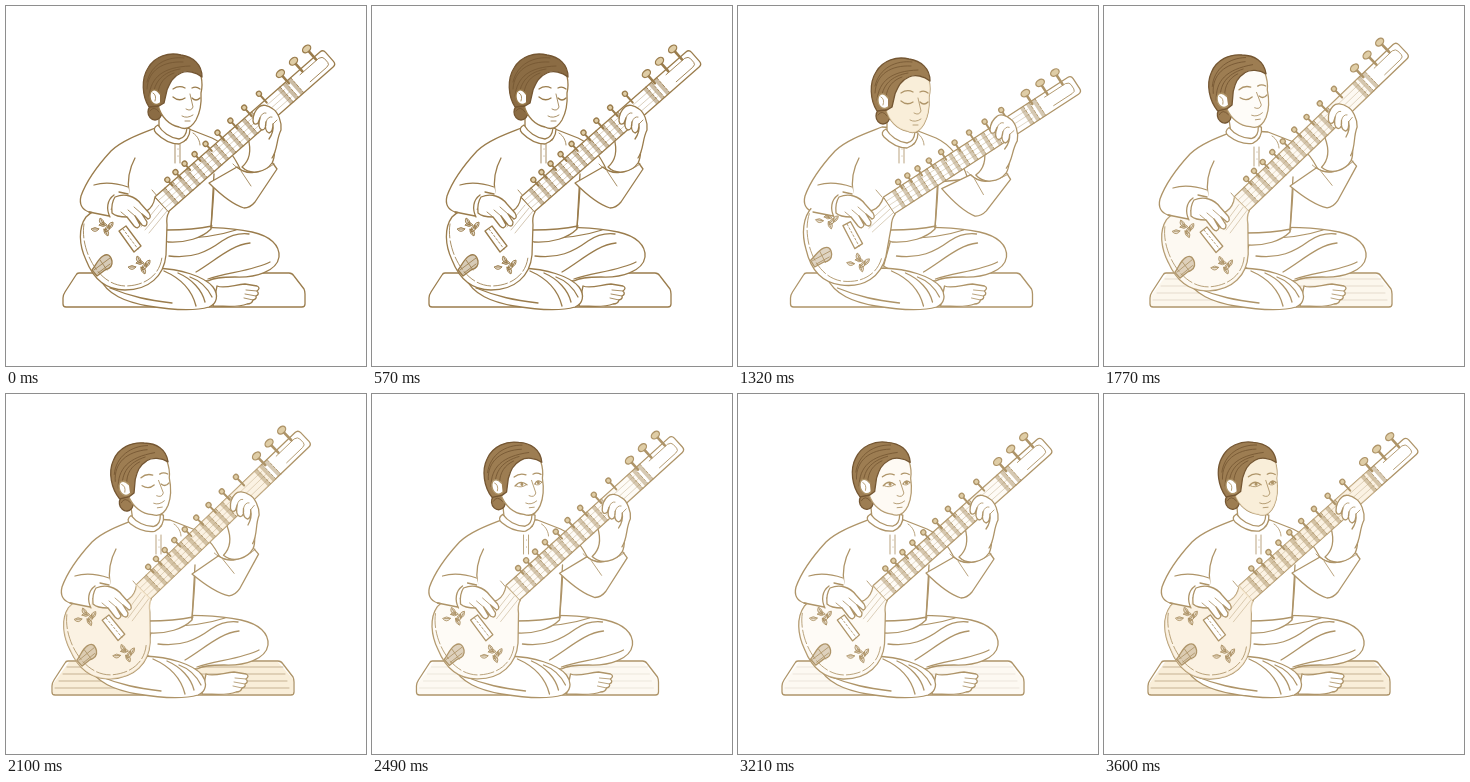
An HTML page that plays this animation: 360x360 px, repeating every 3.63 s.

```html
<!DOCTYPE html>
<html lang="en">
<head>
<meta charset="utf-8">
<title>Sitar player</title>
<style>
html, body { margin: 0; width: 100%; height: 100%; overflow: hidden; background: #fff; }
svg { display: block; width: 100vw; height: 100vh; }
.line { fill: none; stroke: currentColor; stroke-width: 1.3; stroke-linecap: round; stroke-linejoin: round; }
.thin { stroke-width: .85; }
.white { fill: #fff; }
.wood, .mat, .skin { fill: #f8ead0; stroke: none; }
.strand { stroke: #745632; stroke-width: .8; }
.hair { stroke: #745632; }
</style>
</head>
<body>
<svg id="stage" viewBox="0 0 360 360" class="line">
  <g class="seat">
    <path class="white" d="M73 267H283Q286 267 288 270L298 283Q299 285 299 288V298Q299 301 296 301H60Q57 301 57 298V292Q57 289 59 286L70 269Q71 267 73 267Z"/>
    <g class="mat"><path d="M74 268H283L298 285V300H58V290Z"/><g id="planks" class="line thin"></g></g>
    <path class="white" d="M160 224C190 219 226 222 246 226C264 230 274 239 273 251C271 265 250 272 229 271C216 271 207 272 202 275C182 274 166 270 150 260Z"/>
    <path d="M160 232C187 233 209 231 230 224M163 250C186 253 201 246 216 235C225 229 235 227 243 228M190 266C210 254 225 239 244 237M202 273C220 267 249 264 264 256"/>
    <path class="white" d="M211 280C218 283 228 279 239 278L251 280Q255 282 251 285Q254 288 250 290Q251 293 247 294Q246 298 241 298C232 302 220 300 207 300Z"/>
    <path class="thin" d="M240 284L251 285M239 288L250 290M238 292L247 294"/>
    <path class="white" d="M150 262C174 263 198 270 207 281C213 289 211 298 203 301C186 306 160 303 142 300C120 296 101 289 93 271Z"/>
    <path d="M104 282C126 291 142 294 166 297M158 265C174 272 186 284 190 300M172 267C186 273 196 284 199 296M184 271C195 275 202 283 206 291"/>
  </g>
  <g class="body">
    <path class="white" d="M152 121C137 127 116 134 105 145C93 158 80 176 75 190Q72 202 83 206L104 210L162 236C180 237 196 232 205 223C206 207 208 190 208 176L238 173C231 152 219 138 206 132L183 123Z"/>
    <path d="M129 152C123 163 121 173 123 187M208 168C207 186 206 202 205 222M161 224C178 224 192 223 206 220"/>
    <path class="thin" d="M169 138V157M174 138V157M172 143V143.1M172 150V150.1M187 127C192 130 194 136 194 139M146 184L152 191"/>
  </g>
  <g class="arm">
    <path class="white" d="M203 177C212 186 225 198 238 202Q244 202 249 196L271 163L266 156C254 168 241 170 231 161Z"/>
    <path class="thin" d="M227 158C237 169 252 169 268 158M235 165L245 180"/>
    <path class="white" d="M236 161C245 170 260 166 266 157C271 149 266 139 273 124L258 105L242 132C246 146 243 155 236 161Z"/>
  </g>
  <g class="sitar">
    <path class="white" d="M149 191C147 204 137 211 121 207C107 201 89 201 80 211C72 222 73 239 80 254C87 272 100 284 119 284C143 284 158 270 160 249L161 219Q160 211 163 206Z"/>
    <path class="wood" d="M149 191C147 204 137 211 121 207C107 201 89 201 80 211C72 222 73 239 80 254C87 272 100 284 119 284C143 284 158 270 160 249L161 219L163 206Z"/>
    <path class="thin" d="M78 218C74 242 91 279 119 280C139 280 154 269 156 251" stroke-dasharray="14 3"/>
    <path class="thin" opacity=".5" d="M135 221L153 199M139 224L157 202M143 227L161 205"/>
    <g id="flowers" class="thin"></g>
    <path class="white" d="M113 225L120 220L135 240L128 246Z"/>
    <path class="thin" d="M117 223L132 243" stroke-dasharray="2 2"/>
    <path fill="currentColor" fill-opacity=".4" d="M86 264C90 259 92 253 97 250Q104 246 106 255Q107 262 99 264L91 270Z"/>
    <path class="thin" d="M88 264L104 252M92 267L104 258M94 254L101 264"/>
    <g transform="translate(156 198) rotate(-41.3)">
      <path class="white" d="M0 -10H219Q223 -10 223 -6V6Q223 10 219 10H0"/>
      <path class="wood" d="M-2 -10H172V10H-2Z"/>
      <path class="thin" opacity=".4" d="M0 -5H168M0 0H170M0 5H168"/>
      <path class="thin" d="M189 -6H214Q218 -5 218 -2V3Q218 6 214 6H192"/>
      <g id="frets"></g>
      <g id="pegs"></g>
    </g>
  </g>
  <g class="arm">
    <path class="white" d="M266 152C272 143 270 134 275 124C276 116 272 106 267 103C262 99 256 98 253 101Q247 106 247 115Q248 120 252 117L254 112Q251 122 256 124Q260 124 260 116Q258 125 263 127Q267 126 267 118Q268 126 263 133"/>
    <path class="thin" d="M254 112Q256 106 260 107M260 116Q262 110 266 111M267 118L271 114"/>
  </g>
  <g class="body">
    <path class="white" stroke="none" d="M122 180C110 178 96 176 87 182L78 200L88 207L103 210L108 190L124 188Z"/>
    <path d="M122 181C110 177 98 176 88 179M83 206L103 210M108 189C101 194 100 203 104 211M113 186L122 188"/>
    <path class="white" d="M109 191C119 187 129 190 135 198L143 207Q146 212 142 213L136 208L141 216Q141 222 136 219L129 210L134 219Q132 224 128 220L121 211C116 211 110 211 106 207Q105 197 109 191Z"/>
    <path class="thin" d="M136 208L128 201M129 210L122 204M121 211L115 206"/>
  </g>
  <g class="head">
    <path class="white" d="M153 104V122C157 132 172 138 180 134L183 121V108Z"/>
    <path class="white" d="M152 119C148 121 147 124 150 127C158 135 167 138 173 138Q184 134 184 123L181 122Q180 132 173 133C164 132 156 126 152 119Z"/>
    <ellipse class="hair" cx="149" cy="106" rx="7" ry="8"/>
    <path class="white" d="M155 73C166 57 190 58 195 70Q197 79 195 87Q196 103 190 114Q183 126 173 121C163 119 155 111 152 99Z"/>
    <path class="skin" d="M155 73C166 57 190 58 195 70Q197 79 195 87Q196 103 190 114Q183 126 173 121C163 119 155 111 152 99Z"/>
    <path class="hair" d="M143 101C136 90 135 73 142 62C149 50 163 46 175 49C187 51 196 58 196 71C190 66 181 64 175 67C166 71 164 77 161 84L158 97L153 100Z"/>
    <path class="strand" d="M141 83C142 64 157 55 177 56M143 90C145 71 157 61 184 60M147 91C148 75 157 66 174 63M152 87C153 77 159 70 168 67M141 76C145 58 162 50 178 52M144 105Q148 99 153 106"/>
    <path class="white" d="M154 88C149 81 144 84 144 90C144 96 149 101 154 97"/>
    <path class="thin" d="M147 87Q151 89 149 95M184 88L187 101Q185 106 180 103M176 110Q181 113 187 109M179 115L184 115"/>
    <path d="M167 83Q173 79 179 82M186 82Q190 80 194 83"/>
    <path id="shut" d="M167 91Q173 96 179 92M186 92Q190 96 194 92"/>
    <g id="open">
      <path d="M167 92Q173 86 179 92M187 92Q190 87 194 91"/>
      <path class="thin" d="M168 92Q173 95 178 92M187 92Q190 95 194 91"/>
      <path stroke-width="3" d="M174 91V91.1M190.5 90.8V91"/>
    </g>
  </g>
</svg>
<script>
const LOOP = 3630;
const $ = id => document.getElementById(id);
const each = (sel, fn) => document.querySelectorAll(sel).forEach(fn);
const repeat = (n, fn) => Array.from({ length: n }, (_, i) => fn(i)).join("");

$("planks").innerHTML = repeat(4, i => `<path d="M${72 - i * 4} ${273 + i * 7}H${288 + i * 2}"/>`);

// Along the neck: x runs from the gourd to the tip, y across it.
const fret = x => `<path d="M${x} -10V10" stroke-width="3.6" stroke-linecap="butt" opacity=".5"/>
  <path d="M${x + 2} -10V10" class="thin" stroke-dasharray="3 1.5"/>`;
$("frets").innerHTML = repeat(13, i => fret(11 + i * 9.6)) + repeat(3, i => fret(164 + i * 7));

function peg(x, big) {
  const top = -14 - x / 30;
  return `<path d="M${x} ${top}V-7" stroke-width="${big ? 2.6 : 2}"/>
    <ellipse cx="${x}" cy="${top}" rx="${big ? 4.6 : 2.5}" ry="${big ? 3.2 : 2.5}" fill="#dfcda6"/>`;
}
$("pegs").innerHTML = repeat(9, i => peg(20 + 10.5 * i + .65 * i * i, false)) +
  repeat(3, i => peg(175 + 18 * i, true));

const spray = (x, y) => repeat(6, i => `<path d="M0 0Q4 -5 8 0Q4 3 0 0H6" fill="currentColor" fill-opacity=".25"
  transform="translate(${x + (i % 3) * 5 - 5} ${y + (i % 2) * 4 - 2}) rotate(${i * 60})"/>`);
$("flowers").innerHTML = spray(98, 221) + spray(135, 259);

// Four poses per part, each as x, y and turn: rest, neck low, neck high, looking up.
const parts = {
  seat: { pivot: "0 0", poses: [[0, 0, 0], [-4.5, 0, 0], [-11, 0, 0], [-13, 0, 0]] },
  body: { pivot: "0 0", poses: [[0, 0, 0], [-8, 0, 0], [-19, 3, 0], [-17, 3, 0]] },
  head: { pivot: "165 90", poses: [[0, 0, 0], [-4, 4, 0], [-31, 1, -8], [-22, 0, -5]] },
  sitar: { pivot: "117 245", poses: [[0, 0, 0], [-11, -5, 8.3], [-16, 1, -2.5], [-13.5, 1, -.4]] },
  arm: { pivot: "237 201", poses: [[0, 0, 0], [-1, 8, 4], [-15, 0, -5], [-15, 2, 0]] }
};

const mix = (a, b, p) => a.map((v, i) => v + (b[i] - v) * p);
function ramp(t, from, to) {
  const p = Math.min(1, Math.max(0, (t - from) / (to - from)));
  return p * p * (3 - 2 * p);
}
const pulse = (t, peak, period, power) =>
  (.5 + .5 * Math.cos((t - peak) / period * 2 * Math.PI)) ** power;
const rgb = c => `rgb(${c.map(Math.round)})`;

function draw(t) {
  const phase = ramp(t, 600, 1220) + ramp(t, 1340, 1720) + ramp(t, 2150, 2650);
  const i = Math.min(2, Math.floor(phase));
  for (const [name, { pivot, poses }] of Object.entries(parts)) {
    const [x, y, turn] = mix(poses[i], poses[i + 1], phase - i);
    each("." + name, el => el.setAttribute("transform", `translate(${x} ${y}) rotate(${turn} ${pivot})`));
  }

  const glow = ramp(t, 1300, 1800) * pulse(t, 2100, 1500, 1.5);
  const blush = ramp(t, 600, 1200) * pulse(t, 1320, 2280, 4);
  each(".mat", el => el.style.opacity = glow * .8);
  each(".wood", el => el.style.opacity = glow * .6);
  each(".skin", el => el.style.opacity = blush * .8);

  const fade = ramp(t, 600, 1320);
  $("stage").style.color = rgb(mix([154, 124, 76], [174, 148, 104], fade));
  each(".hair", el => el.style.fill = rgb(mix([139, 108, 68], [157, 125, 82], fade)));

  const awake = t >= 2450;
  $("open").style.display = awake ? "" : "none";
  $("shut").style.display = awake ? "none" : "";
}

const start = performance.now();
function tick(now) {
  draw(Math.max(0, now - start) % LOOP);
  requestAnimationFrame(tick);
}
draw(0);
requestAnimationFrame(tick);
</script>
</body>
</html>
```
